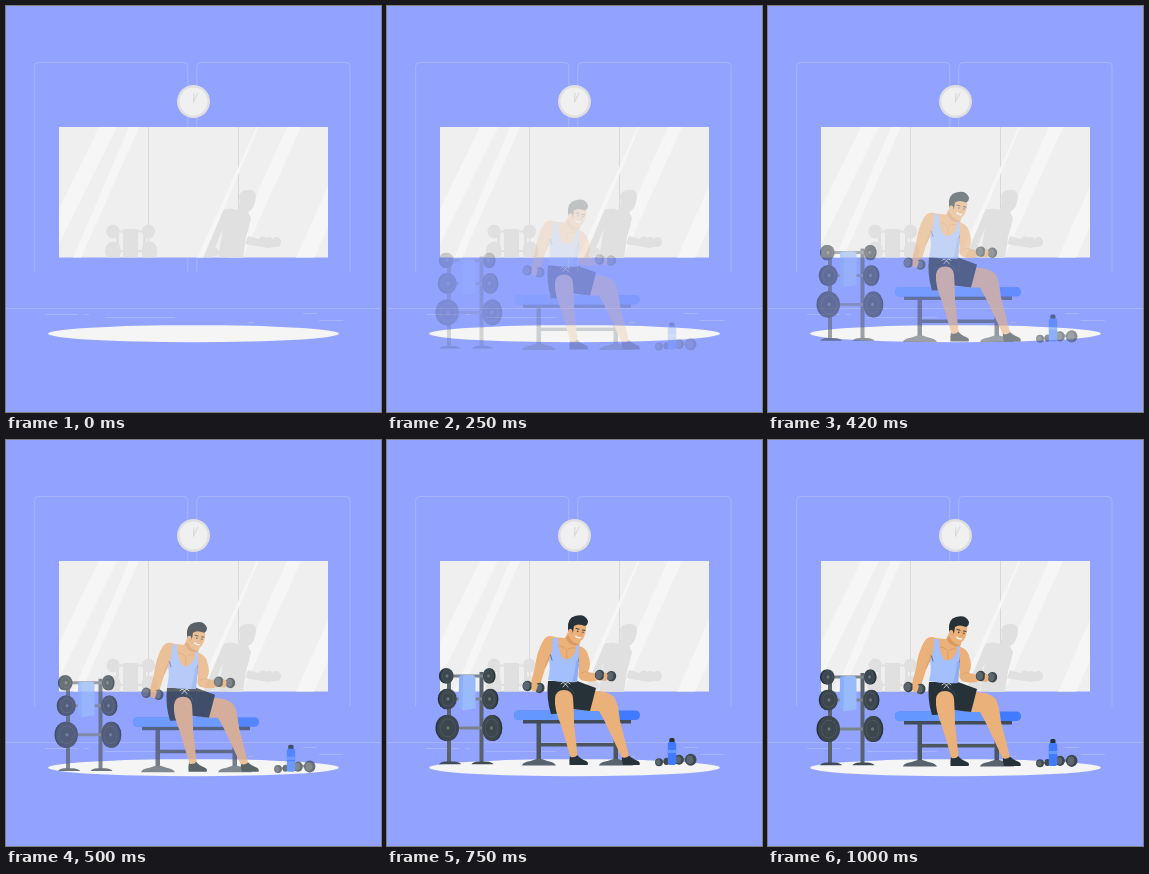
Write an HTML page with a canvas that moves like this. It is 375 by 406 pixels and loops after 1.04 s.

```html
<!DOCTYPE html>
<html lang="en">
<head>
<meta charset="utf-8">
<title>Gym</title>
<style>
html, body { margin: 0; width: 100%; height: 100%; overflow: hidden; background: #92a3ff; }
canvas { display: block; width: 375px; height: 406px; }
</style>
</head>
<body>
<canvas id="stage"></canvas>
<script>
const W = 375, H = 406, LOOP = 1040, FPS = 24, RISE = 22.5;
const INK = '#263238', STEEL = '#4b565f', DISC = '#3b464d', RIM = '#525d66';
const SKIN = '#ebb17a', SHADE = '#d99a62', TOP = '#a3bffc', BLUE = '#407bff', GHOST = '#e0e0e0';
const dpr = window.devicePixelRatio || 1;

function setup(canvas) {
  canvas.width = Math.round(W * dpr);
  canvas.height = Math.round(H * dpr);
  const c = canvas.getContext('2d');
  c.scale(dpr, dpr);
  return c;
}

const stage = setup(document.getElementById('stage'));
const back = setup(document.createElement('canvas'));
const front = setup(document.createElement('canvas'));
let g = back;

function fill(color, path) {
  g.fillStyle = color;
  g.fill(new Path2D(path));
}

function line(color, width, path) {
  g.strokeStyle = color;
  g.lineWidth = width;
  g.lineCap = g.lineJoin = 'round';
  g.stroke(new Path2D(path));
}

function box(color, x, y, w, h, r = 0) {
  g.fillStyle = color;
  g.beginPath();
  g.roundRect(x, y, w, h, r);
  g.fill();
}

function oval(color, x, y, rx, ry = rx, turn = 0) {
  g.fillStyle = color;
  g.beginPath();
  g.ellipse(x, y, rx, ry, turn, 0, Math.PI * 2);
  g.fill();
}

function drawRoom() {
  box('#92a3ff', 0, 0, W, H);
  const faint = 'rgba(235,235,235,.3)';
  for (const x of [28.6, 190.8]) {
    line(faint, .8, `M${x} 266V60.5q0-4 4-4h145.2q4 0 4 4V266`);
  }
  box(faint, 0, 302, W, .8);
  const dashes = [[39, 308, 33], [78, 308, 5], [99, 311, 70], [242, 316, 6], [297, 307, 14], [313, 314, 24]];
  for (const [x, y, w] of dashes) box(faint, x, y, w, .8);
  oval('#f5f5f5', 187.5, 327.7, 145.4, 8.5);
}

function drawClock() {
  oval('#dfdfdf', 187.5, 95.5, 16.5);
  oval('#f0f0f0', 187.5, 95.5, 14);
  line('#d6d6d6', 1, 'M187.5 96L188 87.5M187.5 96L192 87');
}

function drawMirror() {
  g.save();
  g.beginPath();
  g.rect(53, 121, 269, 130.5);
  g.clip();
  box('#efefef', 53, 121, 269, 131);
  const glare = '#f6f6f6';
  fill(glare, 'M93 121H111L53 238V203Z');
  fill(glare, 'M123 121H133L75 252H67Z');
  fill(glare, 'M281 121H295L236 252H222Z');
  fill(glare, 'M322 180L290 252H308L322 221Z');
  for (const x of [142, 232]) box('#d8d8d8', x, 121, 1, 131);

  // Reflected rack
  box(GHOST, 107, 224.5, 36, 2);
  box(GHOST, 107, 244, 36, 2);
  for (const x of [110, 137]) box(GHOST, x, 222, 3, 30);
  box(GHOST, 117, 223, 15, 30, 1);
  for (const x of [107, 142.5]) {
    oval(GHOST, x, 225.5, 6.5, 7);
    oval(GHOST, x + (x > 120 ? 1 : 0), 245, 8, 9.5);
  }

  // Reflected man
  fill(GHOST, 'M233 190Q235 183 243 184Q250 183 250 191Q249 203 242 206L245 212Q243 222 240 231L237 252H212L217 222L205 252H195L205 231Q210 212 216 204Q225 201 231 204Q235 201 233 190Z');
  fill(GHOST, 'M242 230L256 234L274 236V240L262 242L239 238Z');
  oval(GHOST, 257, 235, 4.5);
  oval(GHOST, 263, 235, 4);
  oval(GHOST, 270.5, 236, 4.5, 5);
  oval(GHOST, 208, 246, 5, 4.5);
  fill(glare, 'M250.5 121H252.5L197 252H191Z');
  g.restore();
}

function disc(x, y, rx, ry, side) {
  oval(INK, x + side * 1.5, y, rx, ry);
  oval(DISC, x, y, rx, ry);
  oval(RIM, x, y, rx * .72, ry * .72);
  oval(DISC, x, y, rx * .66, ry * .66);
  oval('#69747c', x, y, 1.5, 1.8);
}

function drawRack() {
  for (const x of [62, 94.5]) {
    box('#59636d', x - 2, 233, 4, 91);
    fill('#414b54', `M${x - 10} 325.2Q${x - 9} 323 ${x - 3} 322.5H${x + 4}Q${x + 11} 323 ${x + 12} 325.2Z`);
  }
  const rows = [[237, 6.6, 7.6, 60, 101.5], [260, 8.8, 10.3, 61, 102.5], [289, 11, 13, 61, 104.5]];
  for (const [y, rx, ry, left, right] of rows) {
    box('#7a838b', left, y - 1.5, right - left, 3);
    disc(left, y, rx, ry, -1);
    disc(right, y, rx * .85, ry, 1);
  }
  fill('#99bbfb', 'M75 238Q76 235.5 79 236H86Q88 236 88.5 239V269.5L75 271.5Z');
  fill('#8aaff8', 'M72 238Q72 236 76 236L75.5 271L71.5 268Z');
}

function drawBench() {
  for (const x of [149.5, 226.5]) {
    box(STEEL, x, 283, 4.5, 39);
    fill('#59636d', `M${x - 14.5} 326.5Q${x - 14} 323 ${x - 6} 322L${x} 320H${x + 5}L${x + 11} 322Q${x + 18} 323 ${x + 19.5} 326.5Z`);
  }
  box(STEEL, 154, 304, 73, 3.5);
  box('#414c58', 136, 280, 108, 4.5);
  box(BLUE, 127, 271.5, 126, 9.5, 4.5);
  fill('#6497ff', 'M131.5 271.5H222Q218 276 222 281H131.5Q127 281 127 276.2Q127 271.5 131.5 271.5Z');
}

function dumbbell(x, y, gap, r, turn) {
  g.save();
  g.translate(x, y);
  g.rotate(turn);
  box('#7a838b', -gap, -1.3, gap * 2, 2.6);
  for (const side of [-1, 1]) {
    oval(DISC, side * gap, 0, r * .95, r);
    oval('#5c666e', side * gap - 1, 0, r * .62, r * .78);
  }
  g.restore();
}

function drawLegs() {
  fill(INK, 'M235 317L241 315.5Q244 319 251 322Q253.5 323.5 252.5 326H236Q234 321 235 317Z');
  fill(SKIN, 'M202 252Q220 251 227 258Q231 263 233 282L242 317Q238 320 234.5 318L218 283L212 272L199 272Z');
  fill(INK, 'M161 242H190L209 249Q206 261 203 272L186 270V274L164 275Q159 259 161 242Z');
  fill(INK, 'M183 317L190 315.5Q192 319 199 322Q202 323.5 200.5 326H182.5Q182 321 183 317Z');
  fill(SKIN, 'M168 259Q169 251 177 251Q185 251 186 259Q187 274 187 284L190.5 316Q188 319 183.5 318L174 286Q167 270 168 259Z');
  line('#46525a', .7, 'M187 255Q185 248 179 249');
  line('#f2f2f2', .8, 'M174 245Q176 242 178.5 245Q181 242 183 245M178.5 245L176 248M178.5 245L181 248');
}

function drawBody() {
  // Resting arm
  fill(SKIN, 'M168 198Q160 195 156 202Q150 212 148 228L144 244Q143 250 148 252Q152 252 153 246L158 230Q162 221 166 214Z');
  // Chest and neck
  fill(SKIN, 'M166 198L178 199L181 193L194 201L192 207Q199 209 201 216L194 226H164Z');
  fill(SHADE, 'M181 196Q184 203 191 205L192 207Q182 207 179 199Z');
  fill(TOP, 'M166 199L171 199Q171 211 175 218Q179 223 185 218Q190 213 189 206L193 207Q192 214 193 219Q191 230 190 243Q175 244 161 241Q164 229 162 221Q166 211 166 199Z');
  fill('#8eacf0', 'M189 222Q188 234 185 243L190 243Q191 230 193 221Z');
  line(SHADE, .8, 'M172 207Q176 207 179 210M180 211Q179 215 180 219M181 210Q185 208 188 209');
  line(SHADE, .8, 'M163 215Q161 221 158 228');
  line('#40505a', .7, 'M163.5 216L165 221M192.5 217L191.8 222');
  // Curling arm
  fill(SKIN, 'M192 207Q199 209 201 216Q205 225 201 233L211 235Q217 233 221 237L219 242L211 241Q203 244 194 241Q190 238 192 231Z');
  line(SHADE, .7, 'M194 234Q199 232 201 233');
}

function drawHead() {
  fill(SKIN, 'M183 185Q190 181 199 184Q200 195 195 201Q190 204 185 199Q180 194 183 185Z');
  fill(INK, 'M181 190Q180 179 188 177Q198 174 201 182Q201 186 198 187Q191 184 187 187L186 193L184 195Q181 193 181 190Z');
  oval(SKIN, 183.5, 192.5, 2, 2.6, -.3);
  line(INK, .9, 'M189 189.5L192 190.2M195.5 191L198 191.5');
  oval(INK, 190.8, 192.4, .7, .8);
  oval(INK, 196, 193.4, .6, .8);
  line(SHADE, .8, 'M194.2 192L194.6 196L193 196');
  line('#ffffff', 1.2, 'M188.7 197.2Q191 199.4 193.5 198.8');
}

function drawFloorKit() {
  box('#7a838b', 271, 321.5, 20, 2.3);
  oval(DISC, 272, 323.2, 3.9, 4);
  oval('#5c666e', 271.3, 323.2, 2.2, 2.8);
  oval(DISC, 279.5, 322.5, 3, 3.6);
  box('#7a838b', 291, 319, 13, 2.6);
  for (const [x, r] of [[292, 4.8], [303.7, 5.8]]) {
    oval(DISC, x, 320.8, r, r + .3);
    oval('#5c666e', x - .8, 320.8, r * .6, r * .75);
  }
  box(INK, 282.3, 299, 5.2, 5, 1.5);
  box(BLUE, 280.8, 303, 8.4, 23, 2);
  box('#659aff', 280.8, 311, 8.4, 3);
}

function drawGym() {
  drawRack();
  drawBench();
  drawLegs();
  drawBody();
  drawHead();
  dumbbell(146.5, 248, 6.2, 5.2, .16);
  fill(SKIN, 'M144.5 245Q149 243 151 246L149 252Q146 253 144.5 250Z');
  dumbbell(218.5, 236.6, 5.8, 5.2, .1);
  fill(SKIN, 'M217 233.5Q220 233 220.5 236L220 241H216.5Z');
  drawFloorKit();
}

// cubic-bezier(.36, -.01, .5, 1.38)
function ease(x) {
  if (x <= 0) return 0;
  if (x >= 1) return 1;
  const curve = (s, a, b) => 3 * (1 - s) ** 2 * s * a + 3 * (1 - s) * s * s * b + s ** 3;
  let lo = 0, hi = 1;
  for (let i = 0; i < 30; i++) {
    const mid = (lo + hi) / 2;
    if (curve(mid, .36, .5) < x) lo = mid; else hi = mid;
  }
  return curve(lo, -.01, 1.38);
}

function render(now) {
  // The scene advances in 24 fps steps, timed to the nearest 10 ms
  const t = Math.floor((now % LOOP) / 10) * 10;
  const step = Math.floor((t + 5) * FPS / 1000);
  const p = ease(step / FPS);

  g = front;
  g.clearRect(0, 0, W, H);
  g.save();
  g.translate(0, RISE * (1 - p));
  drawGym();
  g.restore();

  stage.globalAlpha = 1;
  stage.drawImage(back.canvas, 0, 0, W, H);
  stage.globalAlpha = Math.max(0, Math.min(1, p));
  stage.drawImage(front.canvas, 0, 0, W, H);
}

drawRoom();
drawClock();
drawMirror();

const start = performance.now();
function tick() {
  render(performance.now() - start);
  requestAnimationFrame(tick);
}
tick();
</script>
</body>
</html>
```
